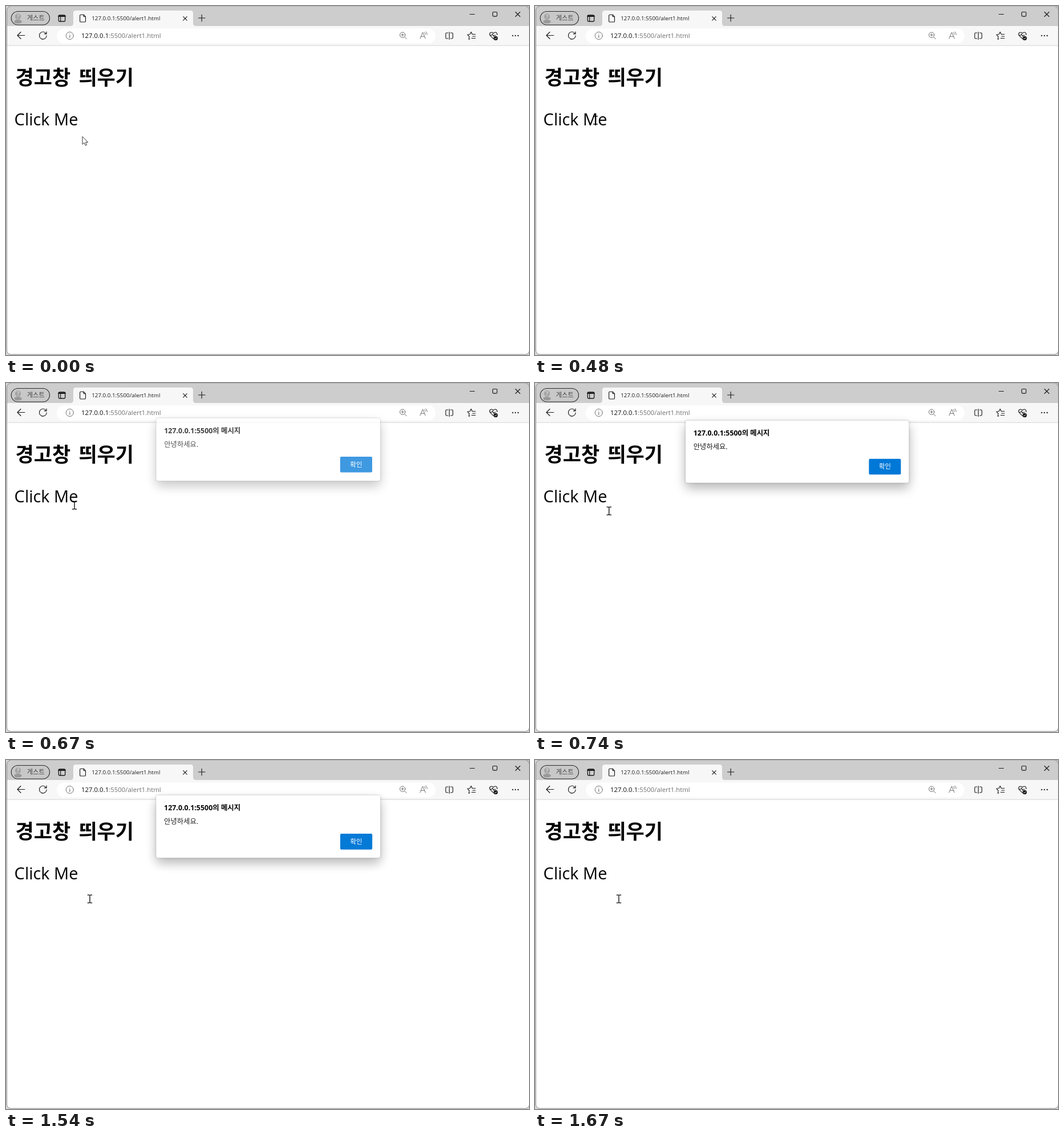
Write an HTML page that moves like this. It is 917x611 px and loops after 2720 ms.

```html
<!DOCTYPE html>
<html lang="ko">
<head>
<meta charset="utf-8">
<title>alert</title>
<style>
html, body { margin: 0; width: 100%; height: 100%; overflow: hidden; background: #fff; }
svg { display: block; width: 917px; height: 611px; }
text { font-family: "Open Sans", "Noto Sans CJK KR", "Noto Sans CJK", sans-serif; white-space: pre; }
.ko { font-family: "Noto Sans CJK KR", "Noto Sans CJK", sans-serif; }
.icon { fill: none; stroke: #1b1b1b; stroke-width: 1.15; stroke-linecap: round; stroke-linejoin: round; }
.soft { stroke: #707070; stroke-width: 1; }
#dialog { filter: drop-shadow(0 9px 10px rgba(0,0,0,.24)) drop-shadow(0 0 1.5px rgba(0,0,0,.28)); }
</style>
</head>
<body>
<svg viewBox="0 0 917 611">
  <!-- window -->
  <rect width="917" height="611" fill="#d6d6d6"/>
  <rect x="1.5" y=".5" width="916" height="609.5" rx="7" fill="#fff"/>
  <path d="M1.5 35V7Q1.5 .5 8 .5H917V35Z" fill="#cdcdcd"/>
  <rect x="1.5" y="35" width="916" height="34" fill="#f7f7f7"/>
  <path d="M1.5 69.2H917" stroke="#d4d4d4"/>
  <rect x="1.5" y=".5" width="916" height="609.5" rx="7" fill="none" stroke="#8c8c8c"/>
  <path d="M8 .5H917" stroke="#b4b4b4"/>

  <!-- tab strip -->
  <rect x="9.2" y="9.5" width="67.3" height="23.5" rx="11.7" fill="#c8c8c8" stroke="#2a2a2a" stroke-width="1.1"/>
  <circle cx="21" cy="18.5" r="5.2" fill="#a4a4a4"/>
  <ellipse cx="21" cy="27.3" rx="6.7" ry="3.3" fill="#999"/>
  <text x="21" y="21.6" font-size="8.5" text-anchor="middle" fill="#fff">?</text>
  <text class="ko" x="36.8" y="24.8" font-size="11.2" fill="#444">게스트</text>
  <g class="icon">
    <rect x="92.3" y="16" width="11.4" height="11" rx="2" stroke-width="1.3"/>
    <path d="M92.5 17.8H103.5" stroke-width="2.6"/>
    <path d="M95.6 18V27"/>
  </g>
  <path d="M113 35Q118 35 118 30V12.5Q118 8 122.500 8H323.500Q328 8 328 12.500V30Q328 35 333 35Z" fill="#f7f7f7"/>
  <path class="icon" d="M136 15.200H131.200Q129.600 15.200 129.600 16.800V26.400Q129.600 28 131.200 28H137.900Q139.500 28 139.500 26.400V18.700L136 15.200V17.400Q136 18.700 137.300 18.700H139.500"/>
  <text x="150.2" y="25.2" font-size="9.8" fill="#1b1b1b">127.0.0.1:5500/alert1.html</text>
  <path class="icon" d="M310.800 18.700L317.300 25.200M317.300 18.700L310.800 25.200"/>
  <path class="icon" d="M337.500 21H349M343.200 15.200V26.800"/>
  <g class="icon">
    <path d="M813.500 14.500H821.500"/>
    <rect x="853.400" y="10.500" width="7.600" height="7.600" rx="1.500"/>
    <path d="M893.300 10.500L901.300 18.500M901.300 10.500L893.300 18.500"/>
  </g>

  <!-- toolbar -->
  <rect x="89" y="39.500" width="664" height="26" rx="13" fill="#fff"/>
  <g class="icon">
    <path d="M32.800 51.500H20M26 45.500L20 51.500L26 57.500"/>
    <path d="M70.200 48.200A6.400 6.400 0 1 0 71.200 52M71 45V48.800H67.200"/>
  </g>
  <g class="icon soft">
    <circle cx="111.800" cy="52" r="6.500"/>
    <path d="M111.800 51.300V55.200M111.800 48.800V48.900" stroke-width="1.200"/>
    <circle cx="695.300" cy="50.700" r="4.700"/>
    <path d="M698.800 54.200L702.300 57.800M693 50.700H697.600M695.300 48.400V53"/>
    <path d="M726 57L730.700 46L735.400 57M727.700 53.300H733.700M733.600 46.200Q735.300 47.400 735.300 49.800M736 45Q738.400 46.800 738.400 50.200"/>
  </g>
  <text x="132" y="56.300" font-size="11.4" fill="#111">127.0.0.1<tspan fill="#707070">:5500/alert1.html</tspan></text>
  <g class="icon">
    <path d="M775 47H772.500Q771 47 771 48.500V55.500Q771 57 772.500 57H775M779.600 47H782Q783.500 47 783.500 48.500V55.500Q783.500 57 782 57H779.600M777.300 45.500V58.500"/>
    <path d="M813 57.700L811.500 58.300L812.300 53.500L809 50.200L813.500 49.500L815.500 45.400L817.500 49.500H823M818 53H823M816.500 56.500H823"/>
    <path d="M854.500 57.300L848.800 51.600Q847 48.800 849.200 46.800Q852 44.800 854.600 47.800Q857.200 44.800 860 46.800Q861.700 48.500 861 50.500M848.500 51.200H851.500L853 49L855 53L856.600 51.200H858.500"/>
  </g>
  <circle cx="858.600" cy="56.400" r="3.700" fill="#1b1b1b"/>
  <path d="M856.900 56.500L858.200 57.800L860.500 55.300" fill="none" stroke="#fff" stroke-width=".9"/>
  <g fill="#1b1b1b"><circle cx="888.400" cy="52" r="1.150"/><circle cx="893.200" cy="52" r="1.150"/><circle cx="898" cy="52" r="1.150"/></g>

  <!-- page -->
  <text class="ko" x="16.500" y="137.700" font-size="35" font-weight="700" word-spacing="4.500">경고창 띄우기</text>
  <text x="14.600" y="208.800" font-size="29">Click Me</text>

  <g id="dialog">
    <rect x="264" y="66.500" width="391.500" height="109" rx="4" fill="#fff"/>
    <text x="277.800" y="92.300" font-size="12.4" font-weight="700">127.0.0.1:5500의 메시지</text>
    <text class="ko" x="277.800" y="116.800" font-size="12.3" fill="#1b1b1b">안녕하세요.</text>
    <rect x="585.500" y="133.500" width="56" height="27.500" rx="2" fill="#0078d7"/>
    <text class="ko" x="613.500" y="151.200" font-size="11.5" text-anchor="middle" fill="#fff">확인</text>
  </g>

  <path id="arrow" d="M.5 .5V14.200L3.700 11.400L5.800 16.200L8 15.200L6 10.600H10.200Z" fill="#fff" stroke="#222" stroke-width=".9" stroke-linejoin="round"/>
  <path id="beam" d="M-4.200 -6.900H-1.200L0 -6.200L1.200 -6.900H4.200M0 -6.500V6.500M-4.200 6.900H-1.200L0 6.200L1.200 6.900H4.200" fill="none" stroke="#000" stroke-width="1.300"/>
</svg>
<script>
const LOOP = 2720;

// [time, shape, x, y]
const pointer = [
  [0, "arrow", 133.5, 228], [280, "arrow", 122.5, 216],
  [340, "beam", 113, 207], [400, "beam", 107, 201], [470, "beam", 106, 200],
  [610, "beam", 113.7, 207], [670, "beam", 120, 214], [740, "beam", 129.8, 224],
  [800, "beam", 140.5, 234], [870, "beam", 145, 240], [940, "beam", 147, 243.2]
];

// [time, opacity, shift, scale]
const popup = [
  [0, 0, 0, 1],
  [610, .1, -13.4, 1.008], [670, .75, -4.5, 1.003], [740, 1, -.7, 1], [800, 1, 0, 1],
  [1540, .98, -4.5, 1.004], [1600, .4, -11, 1.007], [1670, 0, -14, 1.008]
];

const el = id => document.getElementById(id);
const dialog = el("dialog");
const shapes = { arrow: el("arrow"), beam: el("beam") };
const stepAt = (steps, t) => steps.findLast(s => s[0] <= t);

function draw(t) {
  const [, shape, x, y] = stepAt(pointer, t);
  for (const name in shapes) shapes[name].style.display = name === shape ? "" : "none";
  shapes[shape].setAttribute("transform", `translate(${x} ${y})`);

  const [, opacity, shift, scale] = stepAt(popup, t);
  dialog.style.display = opacity ? "" : "none";
  dialog.style.opacity = opacity;
  dialog.setAttribute("transform",
    `translate(459.7 ${121 + shift}) scale(${scale}) translate(-459.7 -121)`);
}

const start = performance.now();
function tick() {
  draw((performance.now() - start) % LOOP);
  requestAnimationFrame(tick);
}
tick();
</script>
</body>
</html>
```
